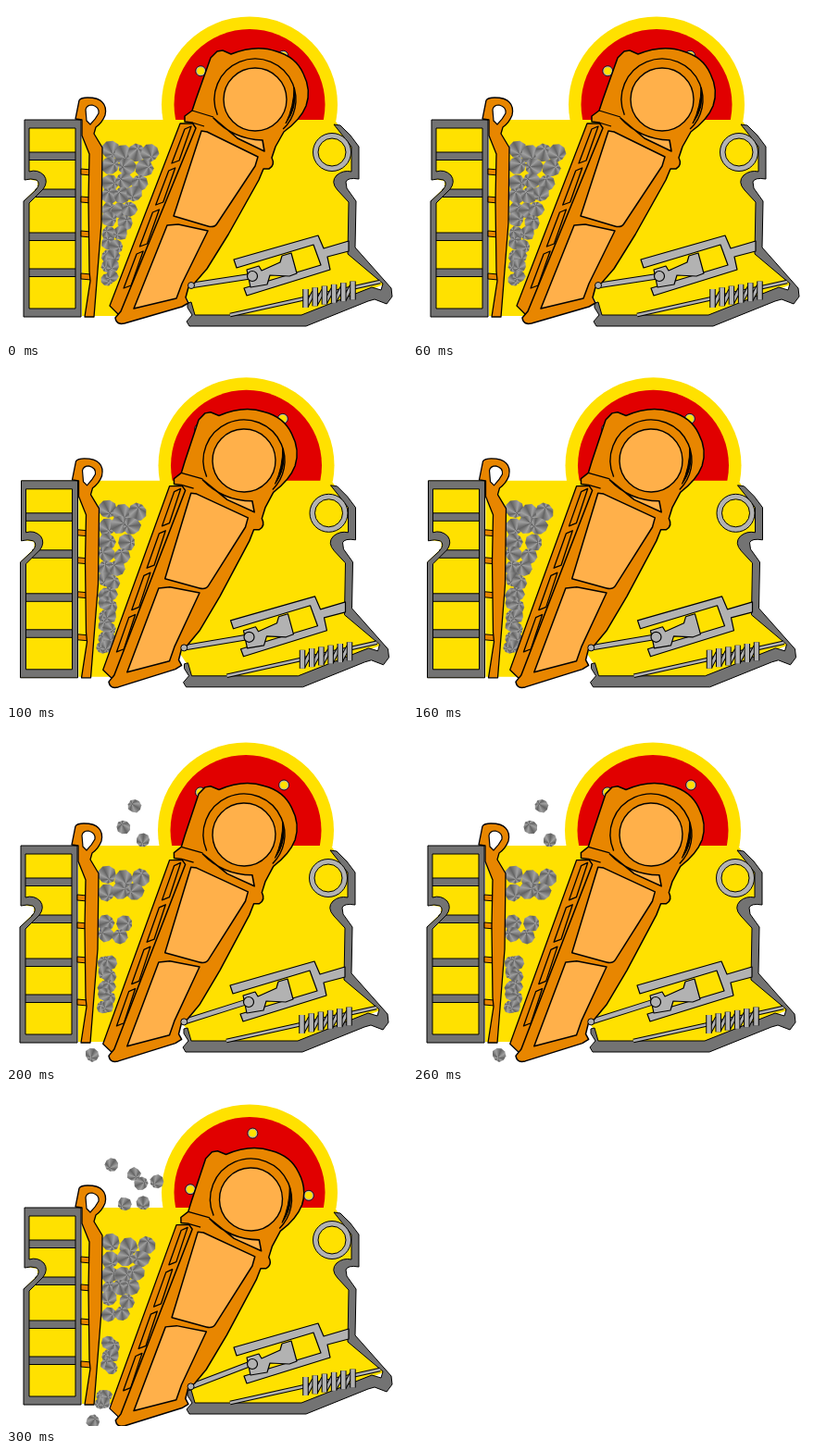
An HTML page with a canvas for the animation above (0.4 s loop, 433x361 px).

```html
<!DOCTYPE html>
<html lang="en">
<head>
<meta charset="utf-8">
<title>Jaw crusher</title>
<style>
html, body { margin: 0; width: 100%; height: 100%; overflow: hidden; background: #fff; }
canvas { display: block; }
</style>
</head>
<body>
<canvas id="stage" width="433" height="361"></canvas>
<script>
const ctx = document.getElementById('stage').getContext('2d');
const YELLOW = '#ffe100', RED = '#e10000', ORANGE = '#e88600', LIGHT = '#ffb04a';
const STEEL = '#737373', SILVER = '#b2b2b2', INK = '#000';
const STEP = 100;
const PIVOT = [269, 101];

// heaps: top and bottom of each pile between the jaws; loose: stones in flight
const poses = [
  { shake: [0, 0], pivot: [269, 101], tilt: 0, wheel: 34.5,
    heaps: [[158, 295]], loose: [] },
  { shake: [-3.5, -1.2], pivot: [257, 100], tilt: -0.021, wheel: 38,
    heaps: [[155, 310]], loose: [] },
  { shake: [-4, 2], pivot: [257, 113], tilt: -0.021, wheel: 40,
    heaps: [[159, 188], [207, 223], [251, 301]],
    loose: [[139, 82], [127, 105], [148, 119], [93, 351]] },
  { shake: [0, 2], pivot: [264.5, 116], tilt: -0.02, wheel: 3,
    heaps: [[165, 238], [273, 298], [328, 340]],
    loose: [[114, 79], [138, 89], [146, 99], [163, 97], [128, 121], [148, 120], [94, 356]] }
];

function shape(d, fill, width = 1.3) {
  const path = new Path2D(d);
  ctx.fillStyle = fill;
  ctx.fill(path, 'evenodd');
  if (!width) return;
  ctx.strokeStyle = INK;
  ctx.lineWidth = width;
  ctx.stroke(path);
}

function disc(x, y, r, fill, width = 0) {
  ctx.beginPath();
  ctx.arc(x, y, r, 0, 7);
  ctx.fillStyle = fill;
  ctx.fill();
  if (!width) return;
  ctx.strokeStyle = INK;
  ctx.lineWidth = width;
  ctx.stroke();
}

function bar(x1, y1, x2, y2, size) {
  ctx.beginPath();
  ctx.moveTo(x1, y1);
  ctx.lineTo(x2, y2);
  ctx.strokeStyle = INK;
  ctx.lineWidth = size + 2;
  ctx.stroke();
  ctx.strokeStyle = SILVER;
  ctx.lineWidth = size;
  ctx.stroke();
}

function seeded(seed) {
  return () => (seed = seed * 16807 % 2147483647) / 2147483647;
}

function rock(x, y, r, rand) {
  ctx.save();
  ctx.translate(x, y);
  ctx.rotate(rand() * 6.3);
  const shine = ctx.createConicGradient(0, -r * 0.5, 0);
  for (let i = 0; i <= 10; i++) shine.addColorStop(i / 10, i % 2 ? '#a0a0a0' : '#636363');
  ctx.beginPath();
  for (let i = 0; i < 9; i++) {
    const k = r * (0.92 + rand() * 0.16), a = i * Math.PI * 2 / 9;
    ctx.lineTo(k * Math.cos(a), k * Math.sin(a));
  }
  ctx.closePath();
  ctx.fillStyle = shine;
  ctx.fill();
  ctx.restore();
}

// Rows of stones fill the gap between the plates and shrink as they are crushed.
function heap(pose, top, bottom, rand) {
  const size = y => 10 - (y - 155) * 0.022;
  for (let y = top; y <= bottom + 1; y += size(y) * 1.6) {
    const r = size(y);
    const face = follow(pose, 187 - (y - pose.pivot[1] - 26) * 0.385, 0)[0];
    const left = 103 + pose.shake[0] + r - Math.max(0, y - 290) * 0.15;
    const right = Math.max(left + 5, Math.min(160, face - r - 10));
    const gaps = Math.max(1, Math.round((right - left) / (r * 1.6)));
    for (let i = 0; i <= gaps; i++)
      rock(left + (right - left) * i / gaps, y + (rand() - 0.5) * 5, r, rand);
  }
}

function rocks(pose) {
  const rand = seeded(4711);
  for (const [top, bottom] of pose.heaps) heap(pose, top, bottom, rand);
  for (const [x, y] of pose.loose) rock(x, y, 7.5, rand);
}

function wheel(degrees) {
  ctx.save();
  ctx.beginPath();
  ctx.rect(160, 0, 210, 124);
  ctx.clip();
  disc(263, 106.5, 95, YELLOW);
  disc(263, 106.5, 81.5, RED);
  for (let i = 0; i < 4; i++) {
    const a = (degrees + i * 90) * Math.PI / 180;
    const x = 263 + 64 * Math.cos(a), y = 106.5 + 64 * Math.sin(a);
    disc(x, y, 5.5, SILVER, 0.8);
    disc(x, y, 4, YELLOW);
  }
  ctx.restore();
}

function housing() {
  shape('M82 123H355L373 150V180L360 183L370 211V267L408 301L390 308L320 336H203L198 320L185 300L130 335H82Z', YELLOW, 0);
  shape('M20 123H81V336H19V211L34 196V189L20 187Z', YELLOW, 0);
  // side frame
  for (const [x, y] of [[24, 158], [32, 198], [24, 245], [24, 284]])
    shape(`M${x} ${y}H76V${y + 8.5}H${x}Z`, STEEL, 1);
  shape('M20 123H81V336H19V211L32 199Q38 192 33 188Q27 186 20 188ZM25 132V179Q34 176 41 183Q46 190 40 198L25 213V327H75V132Z', STEEL, 1);
  // right wall and sole
  shape('M354 128L361 129L372 140L381 152V187Q369 185 367 190L368 197L378 211L377 261L416 305L417 314L411 322L398 317L391 319L324 346H198L195 341L201 334L196 326V321L200 320L204 334H319L395 304L405 307L407 300L369 268L370 212L358 199Q350 190 357 183Q364 177 373 179V152Z', STEEL, 1);
  disc(352, 158, 20.5, SILVER, 1);
  disc(352, 158, 15, YELLOW, 1);
}

function linkage(end) {
  // tension rod and spring
  bar(242, 334, 404, 298, 2.5);
  for (let i = 0; i < 6; i++) {
    const x = 323.5 + i * 10.2, y = 316 - i * 1.7;
    if (i < 5) bar(x + 1, y + 8, x + 9, y - 7, 3);
    bar(x, y - 10, x, y + 10, 4.5);
  }
  // clevis with sliding seat
  shape('M246 274L337 248L343 262L370 254V265L347 271L350 285L260 313L257 305L340 280L332 258L249 283Z', SILVER, 1.2);
  shape('M260 285L273 281L276 286L296 277L298 270L308 267L314 289L306 292L285 291L282 301L264 304Z', SILVER, 1.2);
  bar(...end, 262, 292.5, 4.5);
  disc(266, 292, 5.5, SILVER, 1.2);
}

function fixedPlate() {
  for (const y of [176, 206, 243, 289])
    shape(`M81 ${y}L92 ${y + 1}V${y + 7}L81 ${y + 6}Z`, ORANGE, 1);
  shape('M75 122L79 102Q81 99 88 99Q100 99 104 104Q109 109 107 118Q104 126 97 131L95 138L104 153L103 235L95 336H85L91 297L90 287L89 210L90 160L82 140V123Z', ORANGE);
  shape('M87 124L86 112Q87 107 93 107Q101 109 100 116Q97 122 91 128Z', '#fff', 1.2);
}

function jaw() {
  // wear plate with its windows
  shape('M188 127L202 127L208 132L133 332L123 335L112 324Z', ORANGE);
  for (let i = 0; i < 4; i++) {
    const y = 133 + i * 45, x = 193 - i * 17.3;
    shape(`M${x} ${y}L${x + 7} ${y - 3}L${x - 6} ${y + 34}L${x - 14} ${y + 37}Z`, ORANGE);
  }
  shape('M234 48L243 52Q270 41 292 49Q313 55 321 73Q330 91 324 108Q318 123 300 136L291 152L287 164Q291 172 284 176L278 176L273 188L240 247L217 284L204 299L197 304L194 315L197 321L190 325L128 343Q119 345 118 337L124 330L205 132L201 126L193 125V119L201 113L205 101L221 56L228 49Z', ORANGE, 1.5);
  // bearing head
  ctx.beginPath();
  ctx.arc(269, 101, 44, 2.75, 7.1);
  ctx.strokeStyle = INK;
  ctx.lineWidth = 1.4;
  ctx.stroke();
  shape('M311 88Q315 110 302 127Q311 108 311 88Z', INK, 1);
  shape('M201 113L224 120M201 126L214 130', 'transparent');
  shape('M224 121Q245 144 277 145L279 157L250 143Z', LIGHT, 1.6);
  disc(269, 101, 34, LIGHT, 1.4);
  // panels
  shape('M211 135L217 136L272 163L269 173L228 235Q225 240 218 238L181 227Z', LIGHT, 1.5);
  shape('M174 237L186 236L218 243L190 300L184 316L138 327Z', LIGHT, 1.5);
}

function follow(pose, x, y) {
  const c = Math.cos(pose.tilt), s = Math.sin(pose.tilt);
  const dx = x - PIVOT[0], dy = y - PIVOT[1];
  return [pose.pivot[0] + dx * c - dy * s, pose.pivot[1] + dx * s + dy * c];
}

// Runs the parts with the canvas moved and turned.
function placed([x, y], tilt, ...parts) {
  ctx.save();
  ctx.translate(x, y);
  ctx.rotate(tilt);
  for (const part of parts) part();
  ctx.restore();
}

function draw(pose) {
  const [sx, sy] = pose.shake;
  const [px, py] = follow(pose, 200, 302);
  ctx.clearRect(0, 0, 433, 361);
  ctx.lineJoin = 'round';
  placed(pose.shake, 0, () => wheel(pose.wheel), housing, () => linkage([px - sx, py - sy]));
  rocks(pose);
  placed(pose.shake, 0, fixedPlate);
  placed(pose.pivot, pose.tilt, () => ctx.translate(-PIVOT[0], -PIVOT[1]), jaw);
  disc(px, py, 3.5, SILVER, 1);
}

const start = performance.now();
function tick() {
  const elapsed = performance.now() - start;
  draw(poses[Math.floor(elapsed / STEP) % poses.length]);
  requestAnimationFrame(tick);
}
tick();
</script>
</body>
</html>
```
